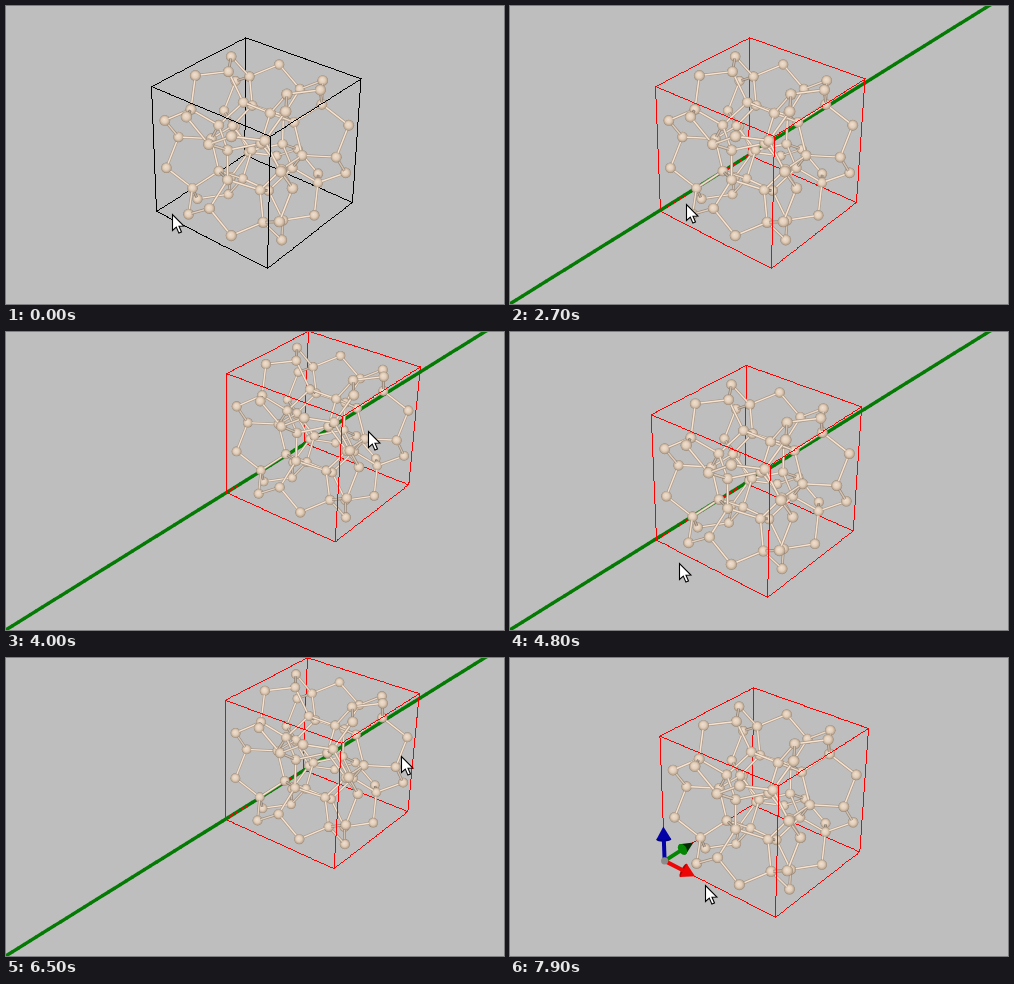
Write an HTML page with a canvas that moves like this. It is 498x298 px and loops after 8 s.

```html
<!DOCTYPE html>
<html lang="en">
<head>
<meta charset="utf-8">
<title>Crystal cell dragged along an axis</title>
<style>
html, body { margin: 0; width: 100%; height: 100%; overflow: hidden; background: #bebebe; }
canvas { display: block; }
</style>
</head>
<body>
<canvas id="stage" width="498" height="298"></canvas>
<script>
const W = 498, H = 298, LOOP = 8000, STEP = 100;
const HOVER = 700, PRESS = 2400, RELEASE = 7800;
const ctx = document.getElementById('stage').getContext('2d');

// Turning points of the gesture; everything between them is eased.
const gesture = [
  { t: 100, slide: 0, x: 166, y: 208 },
  { t: 500, slide: 0, x: 226, y: 158 },
  { t: 1300, slide: 0, x: 222, y: 164 },
  { t: 1600, slide: 0, x: 189, y: 194 },
  { t: 2100, slide: 0, x: 176, y: 198 },
  { t: 2700, slide: 0, x: 176, y: 198 },
  { t: 4100, slide: 0.79, x: 364, y: 98 },
  { t: 5260, slide: -0.47, x: 68, y: 300 },
  { t: 5540, slide: -0.47, x: 170, y: 226 },
  { t: 6390, slide: 0.78, x: 400, y: 95 },
  { t: 7670, slide: 0.043, x: 137, y: 273 },
  { t: 7900, slide: 0.043, x: 195, y: 227 }
];

const lerp = (a, b, k) => a + (b - a) * k;
const mix = (a, b, k) => a.map((v, i) => lerp(v, b[i], k));
const shift = ([x, y, z], s) => [x, y + s, z];

function poseAt(t) {
  const next = gesture.findIndex(g => t <= g.t);
  if (next === 0) return gesture[0];
  const a = gesture[next - 1], b = gesture[next];
  const k = (1 - Math.cos(Math.PI * (t - a.t) / (b.t - a.t))) / 2;
  return { slide: lerp(a.slide, b.slide, k), x: lerp(a.x, b.x, k), y: lerp(a.y, b.y, k) };
}

// Perspective camera in cell units; w grows with depth.
function project([x, y, z]) {
  const w = 1 - 0.0777 * x + 0.092 * y - 0.0653 * z;
  return {
    x: (150 + 90.7 * x + 110.2 * y - 14.47 * z) / w,
    y: (205 + 36.6 * x - 42.8 * y - 130.2 * z) / w,
    w
  };
}

// Type I clathrate cell, with the atoms on its faces repeated on both sides.
function buildAtoms() {
  const atoms = [], U = 0.1837, P = 0.117, Q = 0.309;
  const pair = d => [0.5 - d, 0.5 + d];
  const cycle = (x, y, z) => atoms.push([x, y, z], [z, x, y], [y, z, x]);
  const grid = (xs, ys, zs, add) =>
    xs.forEach(x => ys.forEach(y => zs.forEach(z => add(x, y, z))));
  for (const v of [pair(U), pair(0.5 - U)]) grid(v, v, v, (...p) => atoms.push(p));
  grid([0, 1], pair(0.5 - P), pair(0.5 - Q), cycle);
  grid([0, 1], pair(0.25), [0.5], cycle);
  grid([0.5], pair(Q), pair(P), cycle);
  return atoms;
}
const atoms = buildAtoms();
const bonds = [];
atoms.forEach((a, i) => atoms.slice(i + 1).forEach(b => {
  if (Math.hypot(a[0] - b[0], a[1] - b[1], a[2] - b[2]) < 0.28) bonds.push([a, b]);
}));

const edges = [];
for (const u of [0, 1]) for (const v of [0, 1]) {
  edges.push([[0, u, v], [1, u, v]], [[u, 0, v], [u, 1, v]], [[u, v, 0], [u, v, 1]]);
}

function stroke(a, b, color, width) {
  ctx.strokeStyle = color;
  ctx.lineWidth = width;
  ctx.beginPath();
  ctx.moveTo(a.x, a.y);
  ctx.lineTo(b.x, b.y);
  ctx.stroke();
}

// One-pixel line without smoothing.
function crispLine(a, b, color) {
  const n = Math.ceil(Math.max(Math.abs(b.x - a.x), Math.abs(b.y - a.y)));
  ctx.fillStyle = color;
  for (let i = 0; i <= n; i++) {
    const x = Math.round(lerp(a.x, b.x, i / n)), y = Math.round(lerp(a.y, b.y, i / n));
    ctx.fillRect(x - 0.5, y - 0.5, 1, 1);
  }
}

function fillPath(points, color) {
  ctx.fillStyle = color;
  ctx.beginPath();
  points.forEach(([x, y]) => ctx.lineTo(x, y));
  ctx.closePath();
  ctx.fill();
}

function drawAtom(p) {
  const r = 5.2 / p.w;
  const g = ctx.createRadialGradient(p.x - r * 0.15, p.y - r * 0.2, 0, p.x, p.y, r);
  g.addColorStop(0, '#f0e0d0');
  g.addColorStop(0.55, '#e2cdb9');
  g.addColorStop(0.85, '#bfaa96');
  g.addColorStop(1, '#94836f');
  ctx.fillStyle = g;
  ctx.beginPath();
  ctx.arc(p.x, p.y, r, 0, 7);
  ctx.fill();
}

// Bonds pointing at the viewer catch less light.
function drawBond(a, b) {
  const lit = Math.min(1, 0.6 + Math.hypot(a.x - b.x, a.y - b.y) / 50);
  const tone = (...c) => `rgb(${c.map(v => Math.round(v * lit))})`;
  const w = (a.w + b.w) / 2;
  stroke(a, b, tone(170, 153, 138), 2.7 / w);
  stroke(a, b, tone(246, 226, 206), 1.4 / w);
}

function drawCell(s, color, axisShown) {
  const items = [];
  const add = (w, draw) => items.push({ w, draw });
  const span = (a, b, from, to, draw) => {
    const p = project(shift(mix(a, b, from), s)), q = project(shift(mix(a, b, to), s));
    add((p.w + q.w) / 2, () => draw(p, q));
  };
  for (const a of atoms) {
    const p = project(shift(a, s));
    add(p.w, () => drawAtom(p));
  }
  for (const [a, b] of bonds) span(a, b, 0.14, 0.86, drawBond);
  const parts = 12;
  for (const [a, b] of edges) for (let i = 0; i < parts; i++) {
    span(a, b, i / parts, (i + 1) / parts, (p, q) => crispLine(p, q, color));
  }
  if (axisShown) {
    const point = x => ({ x, y: 297 - 0.6225 * x });
    for (let x = -6; x < 486; x += 6) {
      const depth = 1 + 0.092 * (x - 147) / (110.2 - 0.092 * x);
      add(depth, () => stroke(point(x - 0.5), point(x + 6.5), '#047a04', 3.4));
    }
  }
  items.sort((m, n) => n.w - m.w).forEach(m => m.draw());
}

function drawArrow(s, tip, color, dark, away) {
  const o = project([0, s, 0]);
  const end = project(shift(tip, s));
  const len = Math.hypot(end.x - o.x, end.y - o.y);
  const dx = (end.x - o.x) / len, dy = (end.y - o.y) / len;
  const neck = { x: end.x - dx * 13, y: end.y - dy * 13 };
  const R = away ? 6 : 7.5;
  const cone = () => fillPath([
    [neck.x - dy * R, neck.y + dx * R], [end.x, end.y], [neck.x + dy * R, neck.y - dx * R]
  ], away ? dark : color);
  const base = () => {
    ctx.fillStyle = away ? color : dark;
    ctx.beginPath();
    ctx.ellipse(neck.x, neck.y, away ? 4 : 2.2, R, Math.atan2(dy, dx), 0, 7);
    ctx.fill();
  };
  if (away) { cone(); base(); } else { base(); cone(); }
  stroke(o, neck, color, 4);
}

function drawHandles(s) {
  drawArrow(s, [0, 0.31, 0], '#048604', '#062c06', true);
  drawArrow(s, [0, 0, 0.29], '#0202a6', '#020278', false);
  drawArrow(s, [0.29, 0, 0], '#ee0606', '#b00404', false);
  const o = project([0, s, 0]);
  ctx.fillStyle = '#8c8c8c';
  ctx.beginPath();
  ctx.arc(o.x, o.y, 3.6, 0, 7);
  ctx.fill();
}

function drawCursor(x, y) {
  const shape = [[0, 0], [0, 16], [3.8, 12.6], [6.4, 18.6], [9, 17.5], [6.5, 11.7], [11.4, 11.5]];
  ctx.save();
  ctx.translate(Math.round(x), Math.round(y));
  fillPath(shape, '#fff');
  ctx.strokeStyle = '#000';
  ctx.lineWidth = 1.1;
  ctx.stroke();
  ctx.restore();
}

function draw(t) {
  const dragging = t >= PRESS && t < RELEASE;
  const { slide, x, y } = poseAt(t);
  ctx.fillStyle = '#bebebe';
  ctx.fillRect(0, 0, W, H);
  ctx.save();
  ctx.translate(0.5, 0.5);
  drawCell(slide, t < HOVER ? '#000' : '#f00', dragging);
  if (t >= HOVER && !dragging) drawHandles(slide);
  drawCursor(x, y);
  ctx.restore();
}

const start = performance.now();
function tick() {
  const t = (performance.now() - start) % LOOP;
  draw(Math.floor(t / STEP) * STEP);
  requestAnimationFrame(tick);
}
tick();
</script>
</body>
</html>
```
